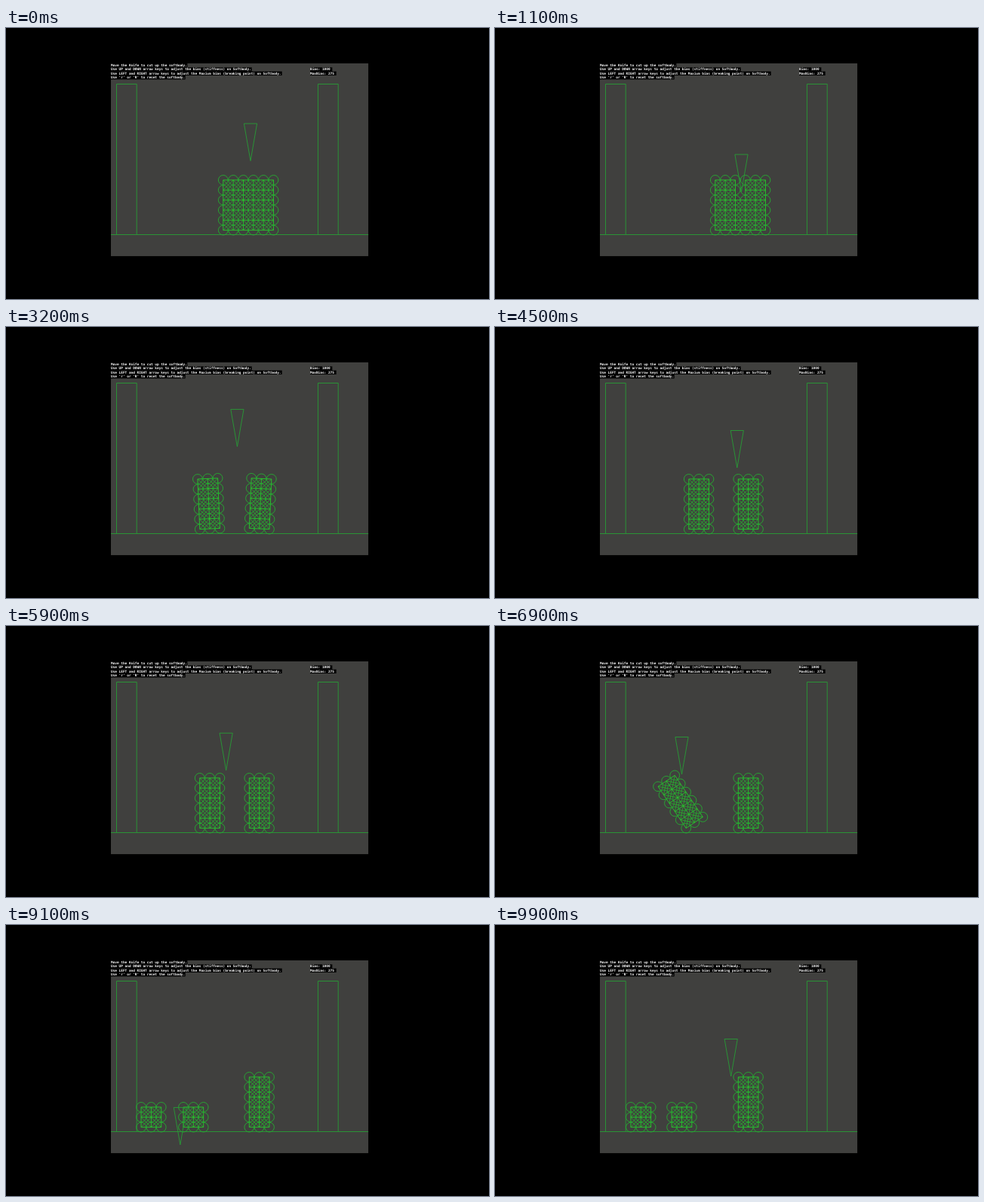
An HTML page that plays this animation: 640 px wide and 360 px high, repeating every 10 s.

```html
<!DOCTYPE html>
<html lang="en">
<head>
<meta charset="utf-8">
<title>Softbody cutting</title>
<style>
  html, body { margin: 0; width: 100%; height: 100%; overflow: hidden; background: #000; }
  svg { display: block; width: 640px; height: 360px; }
  path { fill: none; stroke-width: .9; }
  text { font: bold 4.43px "DejaVu Sans Mono", "Liberation Mono", monospace; fill: #fff; }
  .solid { stroke: #279c36; }
  #rings { stroke: #25ae32; }
  #links { stroke: #28cc2c; }
  #braces { stroke: #28b82c; stroke-width: .75; }
</style>
</head>
<body>
<svg viewBox="0 0 640 360">
  <clipPath id="view"><rect x="139" y="47" width="341.3" height="256.3"/></clipPath>
  <g clip-path="url(#view)">
    <rect x="139" y="47" width="341.3" height="256.3" fill="#40403e"/>
    <path class="solid" d="M139 274.5H480.3M146.5 274.5V74.5H173.2V274.5M413.4 274.5V74.5H440.2V274.5"/>
    <path id="braces"/>
    <path id="links"/>
    <path id="rings"/>
    <path id="knife" class="solid"/>
  </g>
  <g id="labels"></g>
</svg>
<script>
const LOOP = 10000, STEP = 100;
const GAP = 13.333, RADIUS = 6.4, REST = 268.6;
const CHAR = 2.667, LINE = 5.333;
const el = id => document.getElementById(id);

const part = (t, a, b) => Math.min(1, Math.max(0, (t - a) / (b - a)));
const ramp = (t, a, b) => { const s = part(t, a, b); return s * s * (3 - 2 * s); };
const pulse = (t, a, b) => Math.sin(Math.PI * part(t, a, b));

// Turning points of the hand-led knife: time, tip x, top y.
const knifePath = [
  [0, 324, 127], [1100, 326.5, 168], [2300, 303, 262], [3300, 307, 105],
  [4500, 320.8, 137.5], [5600, 297, 139], [6300, 283, 147], [6900, 247.5, 147.5],
  [7300, 234, 143.5], [7700, 222, 170], [8300, 217, 199.5], [8900, 220, 253], [9900, 312.7, 151.5]
];

// Slope that never overshoots: harmonic mean, or zero at a turning point.
function slope(i, axis) {
  const [before, here, after] = [knifePath[i - 1], knifePath[i], knifePath[i + 1]];
  if (!before || !after) return 0;
  const a = (here[axis] - before[axis]) / (here[0] - before[0]);
  const b = (after[axis] - here[axis]) / (after[0] - here[0]);
  return a * b <= 0 ? 0 : 2 * a * b / (a + b);
}

function knifeAt(t, axis) {
  const next = knifePath.findIndex(k => k[0] > t);
  if (next < 0) return knifePath[knifePath.length - 1][axis];
  const from = knifePath[next - 1], to = knifePath[next];
  const span = to[0] - from[0], s = (t - from[0]) / span, r = 1 - s;
  return from[axis] * r * r * (1 + 2 * s) + to[axis] * s * s * (3 - 2 * s)
    + span * s * r * (slope(next - 1, axis) * r - slope(next, axis) * s);
}

// Three columns by six rows, tilted and resting on the floor.
function block(x, degrees) {
  const angle = degrees * Math.PI / 180, c = Math.cos(angle) * GAP, s = Math.sin(angle) * GAP;
  const lift = Math.max(0, 2 * s);
  return (u, v) => [x + u * c + v * s, REST - lift + u * s - v * c];
}

function bodyNodes(t) {
  const nudge = 4 * ramp(t, 0, 1100), cut = ramp(t, 1100, 2300), settle = ramp(t, 2300, 3000);
  // The halves are wedged apart, then rock on their outer corners.
  const rock = 8 * Math.abs(pulse(t, 2300, 3300)) + 4 * pulse(t, 3300, 4300);
  const lean = 6 * pulse(t, 1100, 2300) + rock;
  const sway = -2.4 * pulse(t, 2000, 2600);
  const fall = 90 * part(t, 5700, 7300) ** 3.4;
  const leftX = 287.8 + nudge - 27.7 * cut - 7.3 * settle
    - 7.2 * ramp(t, 6500, 7300) - 4 * pulse(t, 7200, 7900);
  const rightX = 327.8 + nudge - 10.8 * cut + 1.3 * settle;
  const left = block(leftX, sway - lean - fall), right = block(rightX, sway + lean);

  const open = ramp(t, 8300, 8800), bounce = 2 * pulse(t, 8500, 9200);
  const shift = v => v > 2 ? -3 * open - bounce : 11.2 * open + bounce;
  return Array.from({ length: 6 }, (_, v) => Array.from({ length: 6 }, (_, u) => {
    if (u > 2) return right(u - 3, v);
    const [x, y] = left(u, v);
    return [x + shift(v), y];
  }));
}

const point = p => p[0].toFixed(2) + " " + p[1].toFixed(2);
const segment = (a, b) => "M" + point(a) + "L" + point(b);
const ring = ([x, y]) =>
  `M${point([x - RADIUS, y])}a${RADIUS} ${RADIUS} 0 1 1 ${2 * RADIUS} 0a${RADIUS} ${RADIUS} 0 1 1 ${-2 * RADIUS} 0`;

function draw(t) {
  const x = knifeAt(t, 1), y = knifeAt(t, 2), tip = y + 49.5;
  const nodes = bodyNodes(t);
  let links = "", braces = "", rings = "";

  // Links across a cut hold until the tip has passed them.
  function joined(u, v, u2, v2) {
    const uncut = tip < Math.min(nodes[v][u][1], nodes[v2][u2][1]);
    if (u < 3 !== u2 < 3) return t < 1800 && uncut;
    if (u < 3 && v < 3 !== v2 < 3) return t < 7600 || t < 8700 && uncut;
    return true;
  }

  for (let v = 0; v < 6; v++) for (let u = 0; u < 6; u++) {
    rings += ring(nodes[v][u]);
    for (const [du, dv] of [[1, 0], [0, 1], [1, 1], [-1, 1]]) {
      const u2 = u + du, v2 = v + dv;
      if (!nodes[v2] || !nodes[v2][u2] || !joined(u, v, u2, v2)) continue;
      const d = segment(nodes[v][u], nodes[v2][u2]);
      if (du && dv) braces += d; else links += d;
    }
  }
  el("rings").setAttribute("d", rings);
  el("links").setAttribute("d", links);
  el("braces").setAttribute("d", braces);
  el("knife").setAttribute("d", `M${x - 8.6} ${y}H${x + 8.6}L${x} ${tip}Z`);
}

function label(text, x, row, pad = 0) {
  const top = 47 + row * LINE;
  el("labels").insertAdjacentHTML("beforeend",
    `<rect x="${x}" y="${top}" width="${(text.length + pad) * CHAR}" height="${LINE}"/>` +
    `<text x="${x}" y="${top + 4}">${text}</text>`);
}

label("Move the Knife to cut up the softbody.", 139, 0);
label("Use UP and DOWN arrow keys to adjust the bias (stiffness) on Softbody.", 139, 1);
label("Use LEFT and RIGHT arrow keys to adjust the Maxium bias (breaking point) on Softbody.", 139, 2);
label("Use 'r' or 'R' to reset the softbody.", 139, 3);
label("Bias: 1000", 403, 1, 1);
label("MaxBias: 275", 403, 2, 1);

const start = performance.now();
function tick() {
  const t = (performance.now() - start) % LOOP;
  draw(Math.floor(t / STEP) * STEP);
  requestAnimationFrame(tick);
}
tick();
</script>
</body>
</html>
```
